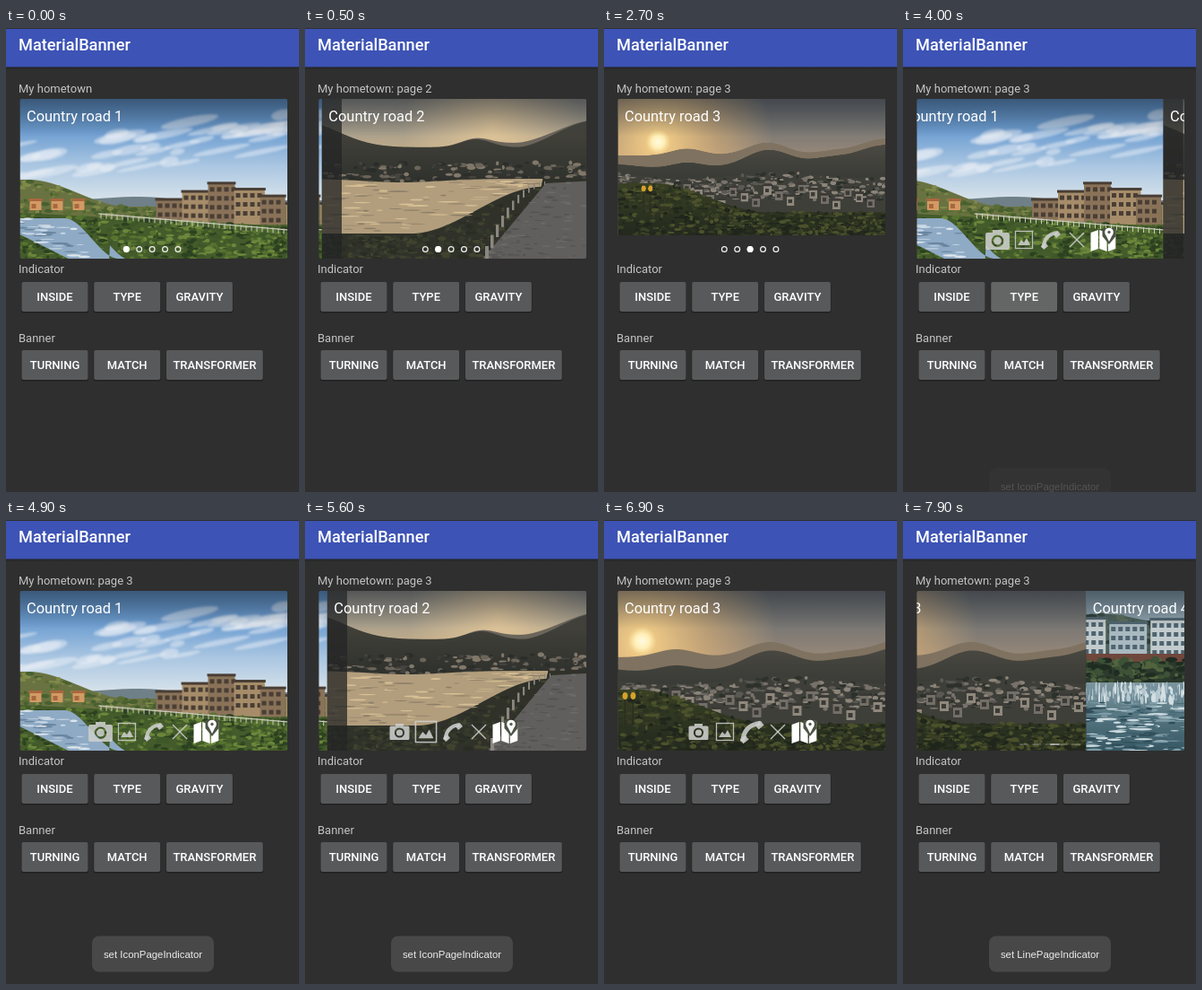
An HTML page with a canvas for the animation above (8 s loop, 327 by 517 pixels).

```html
<!DOCTYPE html>
<html lang="en">
<head>
<meta charset="utf-8">
<title>MaterialBanner</title>
<style>
html, body { margin: 0; width: 100%; height: 100%; overflow: hidden; background: #2f2f2f; }
canvas { display: block; width: 327px; height: 517px; }
</style>
</head>
<body>
<canvas id="stage"></canvas>
<script>
const W = 327, H = 517, LOOP = 8000, STEP = 100;
const BX = 15.5, BY = 79, BW = 298.5, BH = 178, SMALL_H = 152;
// Pictures are wider than the banner so that they still fill it when it shrinks.
const BLEED = 26, LEFT = -BLEED, RIGHT = BW + BLEED;
const canvas = document.getElementById('stage');
const dpr = window.devicePixelRatio || 1;
canvas.width = W * dpr;
canvas.height = H * dpr;
const ctx = canvas.getContext('2d');
ctx.scale(dpr, dpr);

// ---- maths ----
const clamp = v => Math.max(0, Math.min(1, v));
const ramp = (x, a, b) => { const k = clamp((x - a) / (b - a)); return k * k * (3 - 2 * k); };
const bump = (x, mid, width) => Math.exp(-(((x - mid) / width) ** 2));
const within = (t, [a, b]) => t >= a && t < b;
function rng(seed) {
  return () => (seed = (seed * 16807) % 2147483647) / 2147483647;
}

// ---- drawing helpers ----
function rect(c, fill, x, y, w, h) {
  c.fillStyle = fill;
  c.fillRect(x, y, w, h);
}
function round(c, fill, x, y, w, h, r) {
  c.fillStyle = fill;
  c.beginPath();
  c.roundRect(x, y, w, h, r);
  c.fill();
}
function oval(c, fill, x, y, rx, ry = rx, rot = 0) {
  c.fillStyle = fill;
  c.beginPath();
  c.ellipse(x, y, rx, ry, rot, 0, 7);
  c.fill();
}
function poly(c, fill, ...pts) {
  c.fillStyle = fill;
  c.beginPath();
  for (let i = 0; i < pts.length; i += 2) c.lineTo(pts[i], pts[i + 1]);
  c.fill();
}
function line(c, color, width, x0, y0, x1, y1) {
  c.strokeStyle = color;
  c.lineWidth = width;
  c.beginPath();
  c.moveTo(x0, y0);
  c.lineTo(x1, y1);
  c.stroke();
}
function fade(c, y0, y1, ...colors) {
  const g = c.createLinearGradient(0, y0, 0, y1);
  colors.forEach((col, i) => g.addColorStop(i / (colors.length - 1), col));
  return g;
}
function glow(c, x, y, r, ...colors) {
  const g = c.createRadialGradient(x, y, 0, x, y, r);
  colors.forEach((col, i) => g.addColorStop(i / (colors.length - 1), col));
  rect(c, g, x - r, y - r, 2 * r, 2 * r);
}
function text(str, x, y, size, color, weight = 400, align = 'left', font = 'Roboto') {
  ctx.font = `${weight} ${size}px ${font}, sans-serif`;
  ctx.textAlign = align;
  ctx.fillStyle = color;
  ctx.fillText(str, x, y);
}

// ---- scenery helpers ----
function sky(c, ...colors) {
  rect(c, fade(c, 0, 110, ...colors), LEFT, 0, RIGHT - LEFT, BH);
}
// Area between two curves of x.
function land(c, fill, top, bottom = () => BH) {
  c.fillStyle = fill;
  c.beginPath();
  for (let x = LEFT; x <= RIGHT; x += 2) c.lineTo(x, top(x));
  for (let x = RIGHT; x >= LEFT; x -= 2) c.lineTo(x, bottom(x));
  c.fill();
}
// Random flecks between two curves, for foliage, roofs and foam.
function flecks(c, n, w, h, colors, top, bottom = () => BH) {
  const r = rng(n + 7);
  for (let i = 0; i < n; i++) {
    const x = LEFT + r() * (RIGHT - LEFT), a = top(x), b = bottom(x);
    if (b > a) oval(c, colors[i % colors.length], x, a + r() * (b - a), w * (0.3 + r()), h * (0.3 + r()));
  }
}
function house(c, x, y, w, h, wall, dark) {
  rect(c, wall, x, y, w, h);
  rect(c, dark, x - 1, y - 2, w + 2, 3);
  for (let wy = y + 4; wy < y + h - 5; wy += 10) {
    for (let wx = x + 2; wx < x + w - 3; wx += 8) rect(c, dark, wx, wy, 5, 5);
  }
}

// ---- pictures ----
function village(c) {
  sky(c, '#4a7db5', '#6f9fd2', '#a9c6e2', '#d5e1ea');
  const r = rng(11);
  c.filter = 'blur(2.5px)';
  for (let i = 0; i < 50; i++) {
    const x = LEFT + r() * 350;
    oval(c, 'rgba(238,242,247,.5)', x, 72 - x * 0.13 + (r() - 0.5) * 46, 8 + r() * 26, 2 + r() * 4, -0.2);
  }
  c.filter = 'none';
  const hill = x => 90 + 30 * ramp(x, 10, 120);
  const bank = x => 127 + 0.05 * x;
  land(c, '#6f8088', x => 113 - 4 * bump(x, 130, 50));
  land(c, '#697241', hill);
  flecks(c, 260, 4, 2, ['#48602f', '#7f8a49', '#5a6d35'], hill, bank);
  for (let x = 11; x < 65; x += 24) house(c, x, 113, 13, 11, '#d39a64', '#a8683e');
  for (let i = 0; i < 6; i++) {
    const w = 27 + r() * 8, y = 92 + 8 * Math.abs(i - 2.2) + r() * 4;
    house(c, 152 + i * 29, y, w, 140 - y, i % 2 ? '#a68c69' : '#897258', '#493e35');
  }
  land(c, '#445b2b', bank);
  flecks(c, 700, 4, 2, ['#2c4120', '#56732f', '#3e5728', '#6c873c'], bank);
  const near = x => 134 + 46 * ramp(x, 65, 125);
  const water = x => 133 + 45 * ramp(x, 50, 110);
  land(c, '#8faac4', water, x => x < 100 ? 151 + 0.5 * Math.max(0, x) : near(x));
  flecks(c, 160, 8, 1, ['#c9d9e6', '#6985a0', '#dce5ec'], water, x => x < 85 ? 150 + 0.45 * x : 0);
  const rail = x => x < 88 ? BH : 130 + (x - 88) * 0.085;
  for (let x = 90; x < RIGHT; x += 6) rect(c, '#c8cbbb', x, rail(x) - 3, 1, 6);
  line(c, '#c8cbbb', 1.2, 88, rail(88) - 2, RIGHT, rail(RIGHT) - 2);
}

function riverside(c) {
  sky(c, '#7c7b77', '#a89f8c', '#d8b88a', '#c99d70');
  glow(c, 190, 32, 100, 'rgba(255,219,160,.6)', 'rgba(255,219,160,0)');
  const ridge = x => 54 - 30 * ramp(x, 215, 305) - 9 * bump(x, 172, 24) - 28 * bump(x, -20, 55);
  const shore = x => 89 + 4 * bump(x, 90, 60);
  land(c, '#6b655b', x => ridge(x) - 5 * bump(x, 225, 45));
  land(c, fade(c, 30, 90, '#45443d', '#30322d'), ridge);
  flecks(c, 170, 4, 2, ['#6a645a', '#81786a', '#2b2d2a', '#47443f'], x => 70, shore);
  const bend = x => 150 - 52 * ramp(x, 100, 245);
  land(c, '#30322a', shore);
  land(c, '#b29e7d', shore, x => x < 245 ? Math.max(bend(x), shore(x)) : shore(x));
  flecks(c, 140, 10, 0.8, ['#d8c095', '#8d7f68'], shore, x => x < 235 ? bend(x) - 3 : 0);
  flecks(c, 420, 4, 2, ['#292d23', '#41432f', '#353a2c'], x => Math.max(bend(x), shore(x)) + 2);
  poly(c, '#605f5d', 250, 94, RIGHT, 90, RIGHT, BH, 180, BH);
  flecks(c, 240, 5, 1, ['#6c6a67', '#545351'], x => x < 182 ? BH : 93 + (250 - Math.min(x, 250)) * 1.2);
  for (let i = 0; i < 12; i++) {
    const k = i / 11;
    rect(c, '#8a8680', 248 - 66 * k, 92 + 72 * k * k, 1 + 3 * k, 4 + 12 * k);
  }
  rect(c, 'rgba(35,36,37,.75)', LEFT, 0, BLEED + 22, BH);
}

function valley(c) {
  sky(c, '#5c6065', '#777673', '#98897a', '#a4896b');
  glow(c, 27, 56, 150, 'rgba(255,216,140,.95)', 'rgba(240,190,120,.5)', 'rgba(240,190,120,0)');
  glow(c, 27, 56, 16, '#fffbe0', '#fff0ba', 'rgba(255,232,160,0)');
  const ridge = x => 78 - 17 * bump(x, 170, 38) - 9 * bump(x, 65, 30) - 6 * bump(x, 250, 25) - 22 * ramp(x, 240, RIGHT);
  const town = x => 100 + 4 * Math.sin(x / 40);
  land(c, '#7f7260', x => ridge(x) - 4);
  land(c, fade(c, 58, 105, '#4c4a43', '#393b36'), x => ridge(x) + 4 + 10 * bump(x, 60, 80));
  land(c, '#3e3f39', town);
  flecks(c, 380, 4, 2, ['#77716a', '#5b5954', '#2d312b', '#8b8479'], town, x => 132);
  for (let i = 0; i < 17; i++) house(c, 60 + i * 15, 110 + (i * 7) % 23, 10, 12, i % 2 ? '#8f887d' : '#736e67', '#3c3a36');
  const front = x => 110 + 38 * ramp(x, 20, 170);
  land(c, fade(c, 110, BH, '#3a4125', '#23291e'), front);
  flecks(c, 800, 4, 2.2, ['#20261b', '#383f25', '#2a3220', '#4b512b'], front);
  for (const x of [8, 17]) {
    line(c, '#2d2a20', 1.2, x, 117, x, 150);
    oval(c, '#d6a22c', x, 117, 3, 4);
  }
}

function weir(c) {
  sky(c, '#6f8796', '#a6b8c0', '#b9c3c5');
  const hill = x => 36 - 14 * bump(x, 30, 45) + 5 * Math.sin(x / 30);
  land(c, '#4c6058', hill);
  flecks(c, 300, 5, 3, ['#384c42', '#5b6d5c', '#2b3c35'], hill, x => 90);
  for (let i = 0; i < 6; i++) house(c, -20 + i * 46, 31 + (i * 5) % 9, 42, 44, i % 2 ? '#a9b9c0' : '#c2cbcd', '#4f6470');
  rect(c, '#70473c', LEFT, 70, 350, 9);
  rect(c, '#2b3a2c', LEFT, 79, 350, 24);
  flecks(c, 360, 5, 3, ['#1f2c22', '#3d5236', '#52643f'], x => 76, x => 100);
  rect(c, fade(c, 102, BH, '#7e969e', '#557681', '#365763'), LEFT, 102, 350, 76);
  flecks(c, 420, 1.5, 6, ['#b6c8cf', '#7592a0', '#d3dfe3'], x => 107, x => 122);
  flecks(c, 500, 9, 1.2, ['#ccdbe0', '#7f9da8', '#486a77', '#2d4c58'], x => 124);
}

const SCALE = 2;
const photos = [village, riverside, valley, weir].map(draw => {
  const el = document.createElement('canvas');
  el.width = (RIGHT - LEFT) * SCALE;
  el.height = BH * SCALE;
  const c = el.getContext('2d');
  c.scale(SCALE, SCALE);
  c.translate(BLEED, 0);
  draw(c);
  return el;
});

// ---- timeline ----
const TURN = 916; // pause between automatic page turns
const moves = [
  { at: 26, to: 1 }, { at: 26 + TURN, to: 2 }, { at: 3714, to: 0, dur: 600 },
  { at: 5200, to: 1 }, { at: 5200 + TURN, to: 2 }, { at: 7830, to: 3 }
];
const presses = { INSIDE: [[1900, 2100], [3100, 3300]], TYPE: [[3800, 4100], [7000, 7200]] };
const toasts = [
  { label: 'set IconPageIndicator', from: 3935, to: 5850 },
  { label: 'set LinePageIndicator', from: 7080, to: LOOP }
];

function pager(t) {
  let pos = 0, selected = 0;
  for (const { at, to, dur = 800 } of moves) {
    if (t < at) break;
    const left = (1 - clamp((t - at) / dur)) ** 5;
    pos = to + (selected - to) * left;
    selected = to;
  }
  return { pos, selected };
}

// ---- parts ----
function drawBanner(pos, h) {
  const w = (RIGHT - LEFT) * h / BH;
  ctx.save();
  ctx.beginPath();
  ctx.roundRect(BX, BY, BW, h, 2);
  ctx.clip();
  photos.forEach((img, i) => {
    const x = BX + (i - pos) * BW;
    ctx.save();
    ctx.beginPath();
    ctx.rect(x, BY, BW, h);
    ctx.clip();
    ctx.drawImage(img, x + (BW - w) / 2, BY, w, h);
    rect(ctx, fade(ctx, BY, BY + 42, 'rgba(40,45,50,.45)', 'rgba(40,45,50,0)'), x, BY, BW, 42);
    text('Country road ' + (i + 1), x + 7.5, 104, 16.4, '#fff');
    ctx.restore();
  });
  ctx.restore();
}

function drawDots(pos) {
  const x = i => 134.3 + i * 14.4, y = 246.5;
  ctx.strokeStyle = '#f2f2f2';
  ctx.lineWidth = 1.2;
  for (let i = 0; i < 5; i++) {
    ctx.beginPath();
    ctx.arc(x(i), y, 2.9, 0, 7);
    ctx.stroke();
  }
  oval(ctx, '#fff', x(pos), y, 3.4);
}

function drawLines(pos) {
  const x = i => 130 + i * 14.5;
  for (let i = 0; i < 5; i++) rect(ctx, 'rgba(225,225,225,.45)', x(i), 249.5, 10, 1);
  rect(ctx, '#fff', x(pos), 249.5, 10, 1);
}

const GREY = 'rgba(205,207,205,.88)';
function camera() {
  ctx.fillStyle = GREY;
  ctx.beginPath();
  ctx.roundRect(-11, -6.5, 22, 15.5, 1.5);
  ctx.rect(-4.5, -9, 9, 2.5);
  ctx.arc(0, 1, 5.6, 0, 2 * Math.PI);
  ctx.fill('evenodd');
  oval(ctx, GREY, 0, 1, 3.6);
}
function picture() {
  ctx.strokeStyle = GREY;
  ctx.lineWidth = 1.3;
  ctx.strokeRect(-9.5, -9.5, 19, 19);
  poly(ctx, GREY, -7, 6, -3, 0, 0, 3, 3, -2, 7, 6);
}
function phone() {
  ctx.strokeStyle = GREY;
  ctx.lineWidth = 4;
  ctx.beginPath();
  ctx.moveTo(-8, 9);
  ctx.quadraticCurveTo(-7, -6, 8, -8);
  ctx.stroke();
  line(ctx, GREY, 5, -9, 9, -4, 5);
  line(ctx, GREY, 5, 5, -4, 10, -8);
}
function cross() {
  line(ctx, GREY, 1.4, -8, -8, 8, 8);
  line(ctx, GREY, 1.4, 8, -8, -8, 8);
}
function map() {
  for (let i = 0; i < 3; i++) {
    const x = -14 + i * 9.7, slant = i % 2 ? 1.5 : -1.5;
    poly(ctx, '#fff', x, -9.5 - slant, x + 8.4, -9.5 + slant, x + 8.4, 11.5 + slant, x, 11.5 - slant);
  }
  poly(ctx, '#4c5446', -1, -13, 14, -13, 14, -4, 6.5, 5, -1, -4);
  poly(ctx, '#fff', 2, -7, 11, -7, 6.5, 2);
  oval(ctx, '#fff', 6.5, -8.5, 4.8);
  oval(ctx, '#596052', 6.5, -8.5, 1.7);
}
function drawIcons(selected) {
  [camera, picture, phone, cross, map].forEach((draw, i) => {
    const s = i === selected ? 1.22 : 1;
    ctx.save();
    ctx.translate(105.5 + i * 29.5, 236);
    ctx.scale(s, s);
    draw();
    ctx.restore();
  });
}

function drawButtons(labels, y, t) {
  labels.forEach((label, i) => {
    ctx.font = '500 13px Roboto, sans-serif';
    const x = 17.5 + i * 80.7, w = Math.max(74, ctx.measureText(label).width + 15);
    const down = (presses[label] || []).some(p => within(t, p));
    round(ctx, 'rgba(0,0,0,.3)', x - 0.5, y + 1, w + 1, 33.5, 2);
    round(ctx, down ? '#646565' : '#58595a', x, y, w, 33, 2);
    text(label, x + w / 2, y + 21.3, 13, '#fff', 500, 'center');
  });
}

function drawToast({ label, from, to }, t) {
  if (t < from) return;
  const k = clamp((t - from) / 380);
  ctx.save();
  ctx.globalAlpha = k * (1 - clamp((t - to) / 400));
  ctx.translate(0, 39 * (1 - k) ** 2);
  round(ctx, '#484848', 96, 463.5, 136, 40, 8);
  text(label, 164, 488, 11.4, '#ececec', 400, 'center', 'Liberation Sans');
  ctx.restore();
}

function render(t) {
  const { pos, selected } = pager(t);
  rect(ctx, '#2f2f2f', 0, 0, W, H);
  rect(ctx, '#3d53b5', 0, 1, W, 42.5);
  rect(ctx, fade(ctx, 43.5, 47, 'rgba(0,0,0,.25)', 'rgba(0,0,0,0)'), 0, 43.5, W, 3.5);
  text('MaterialBanner', 14, 25, 18.2, '#fff', 500);

  const page = t < 100 ? '' : t < 1000 ? ': page 2' : ': page 3';
  text('My hometown' + page, 14, 72, 13, '#c4c4c4');
  text('Indicator', 14, 273, 13, '#c4c4c4');
  text('Banner', 14, 350, 13, '#c4c4c4');

  drawBanner(pos, within(t, [2000, 3200]) ? SMALL_H : BH);
  if (t < 3800) drawDots(pos);
  else if (t < 7100) drawIcons(selected);
  else drawLines(pos);

  drawButtons(['INSIDE', 'TYPE', 'GRAVITY'], 283, t);
  drawButtons(['TURNING', 'MATCH', 'TRANSFORMER'], 359, t);
  toasts.forEach(toast => drawToast(toast, t));
}

const begin = performance.now();
function tick() {
  const t = (performance.now() - begin) % LOOP;
  render(Math.floor(t / STEP) * STEP);
  requestAnimationFrame(tick);
}
tick();
</script>
</body>
</html>
```
